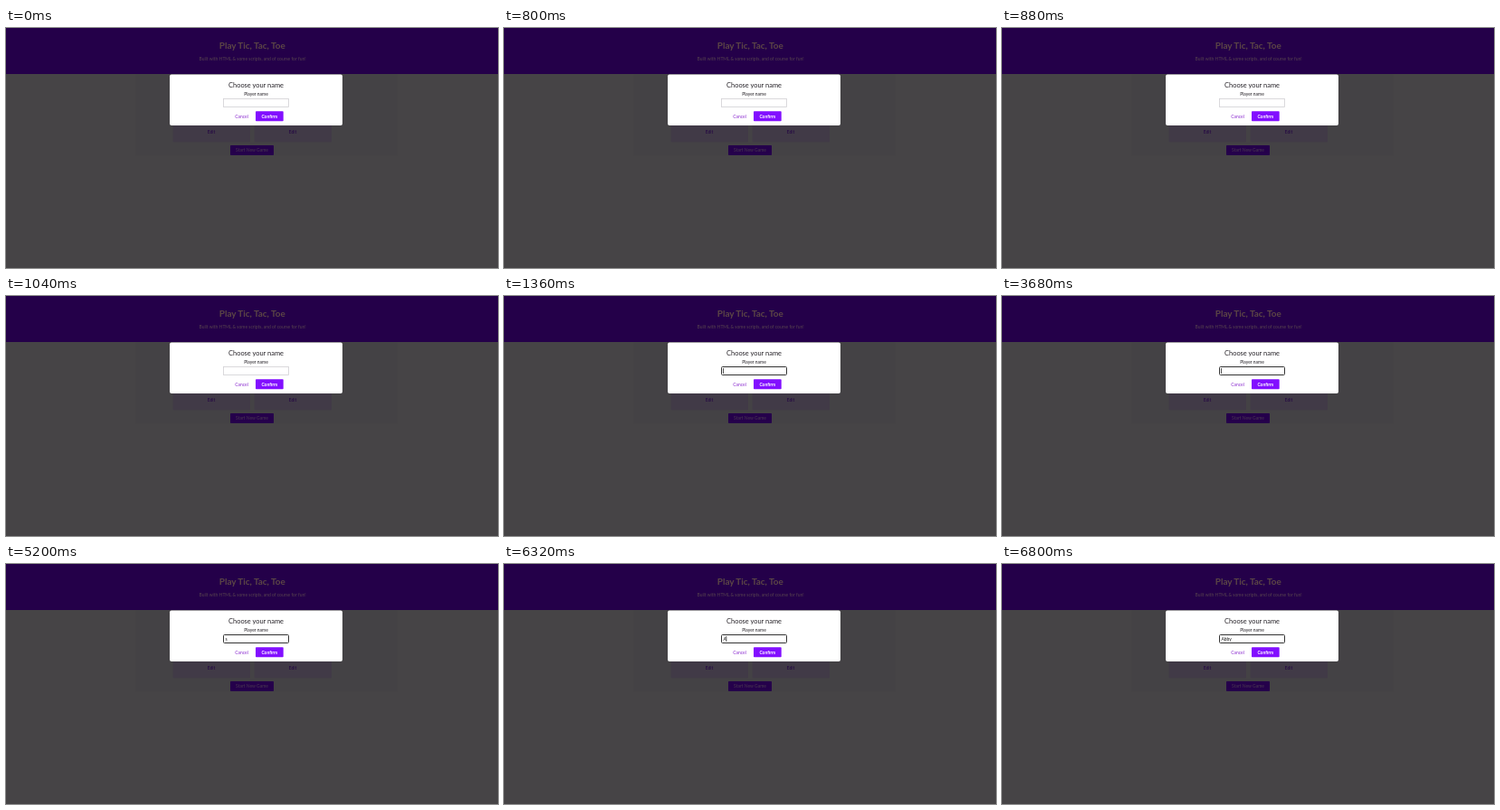
An HTML page for the animation above (8 s loop, 544 by 266 pixels).

```html
<!DOCTYPE html>
<html lang="en">
<head>
<meta charset="utf-8">
<title>Choose your name</title>
<style>
  html, body { margin: 0; width: 100%; height: 100%; overflow: hidden; background: #464446; }
  svg { display: block; width: 544px; height: 266px; }
  text { font: 4.96px Lato, sans-serif; text-anchor: middle; }
  .bold { font-weight: 700; }
  #typed { text-anchor: start; fill: #111; }
</style>
</head>
<body>
<svg viewBox="0 0 544 266">
  <rect width="544" height="266" fill="#464446"/>
  <rect width="544" height="51" fill="#240049"/>
  <text class="bold" x="272.3" y="23.4" style="font-size:9.92px" fill="#5c4646">Play Tic, Tac, Toe</text>
  <text x="272.5" y="36.3" fill="#57434f">Built with HTML &amp; some scripts, and of course for fun!</text>

  <rect x="143.5" y="51" width="289" height="90.5" fill="#444245"/>
  <g fill="#413a47">
    <rect x="184.5" y="60" width="85.5" height="66.5" rx="1"/>
    <rect x="274.5" y="60" width="85.5" height="66.5" rx="1"/>
  </g>
  <g fill="#210043">
    <text x="227" y="117.2">Edit</text>
    <text x="317" y="117.2">Edit</text>
  </g>
  <rect x="248" y="130" width="48" height="11" rx=".8" fill="#25004b"/>
  <text x="272" y="137.2" fill="#4a3b50">Start New Game</text>

  <rect x="181" y="51.5" width="191" height="56.5" rx="2" fill="#fff"/>
  <g class="bold" fill="#242026">
    <text x="276.5" y="66" style="font-size:7.44px">Choose your name</text>
    <text x="276.5" y="74.6">Player name</text>
  </g>
  <rect id="field" x="240.5" y="78.5" width="72" height="9" fill="#fff"/>
  <text id="typed" x="242.4" y="85.3"></text>
  <rect id="caret" y="80" width="1" height="6" fill="#555"/>
  <text x="260.5" y="99.7" fill="#8d2fd0">Cancel</text>
  <rect x="276" y="92.3" width="30.7" height="10.9" rx=".8" fill="#820fff"/>
  <text class="bold" x="291.3" y="99.7" fill="#fff">Confirm</text>
</svg>
<script>
const LOOP = 8000, FOCUS = 1360;
// [start ms, typed text, caret x or null]
const steps = [
  [0, '', null], [FOCUS, '', 242], [2080, '', null], [2640, '', 242],
  [3120, '', null], [3680, '', 242], [4000, '', null], [4160, 'A', null],
  [4560, '', 242], [5200, 's', null], [5680, '', 242], [5760, 'A', null],
  [6320, 'A', 245.3], [6560, 'Ab', null], [6800, 'Abby', null]
];
const [field, typed, caret] = ['field', 'typed', 'caret'].map(id => document.getElementById(id));

function draw(now) {
  const t = now % LOOP;
  const [, text, caretX] = steps.findLast(([start]) => start <= t);
  const focused = t >= FOCUS;
  field.setAttribute('stroke', focused ? '#333' : '#d2d0d4');
  field.setAttribute('stroke-width', focused ? 1 : .8);
  field.setAttribute('rx', focused ? 1 : 0);
  typed.textContent = text;
  caret.setAttribute('x', caretX ?? 0);
  caret.setAttribute('visibility', caretX === null ? 'hidden' : 'visible');
}

const origin = performance.now();
(function tick() {
  draw(performance.now() - origin);
  requestAnimationFrame(tick);
})();
</script>
</body>
</html>
```
